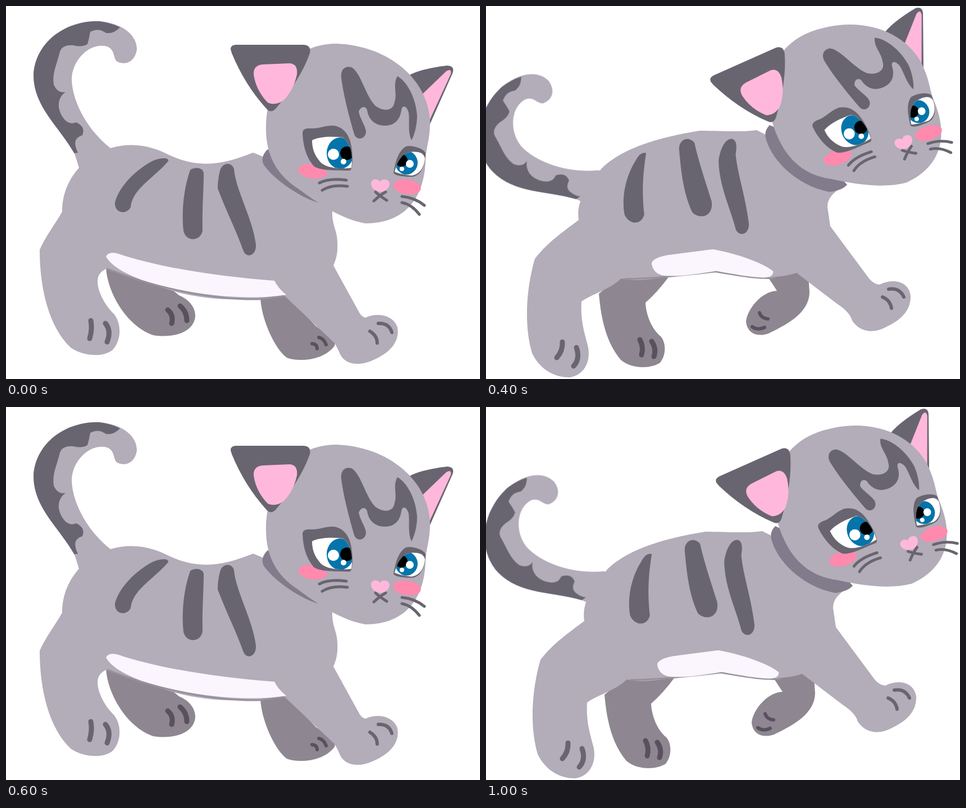
Recreate the animation shown at these times as an HTML page without scripts. Size 844 px wide and 664 px high, loop 1200 ms.

```html
<!DOCTYPE html>
<html lang="en">
<head>
<meta charset="utf-8">
<title>Walking kitten</title>
<style>
  html, body { margin: 0; width: 100%; height: 100%; overflow: hidden; background: #fff; }
  svg { display: block; width: 100%; height: 100%; }
  .fur { fill: #b3acb9; }
  .dark { fill: #696570; }
  .far { fill: #8e8791; }
  .collar { fill: #827b8b; }
  .pink { fill: #ffb8dc; }
  .cheek { fill: #ff8aae; }
  .white { fill: #fff; }
  .belly { fill: #fbf5fd; }
  .iris { fill: #0474aa; }
  .line { fill: none; stroke: #696570; stroke-width: 5; stroke-linecap: round; }
  .toe { stroke-width: 9; }
  .thin { stroke-width: 6; }
  .deep { stroke: #57525d; }
  .shade { fill: none; stroke: #98919d; stroke-width: 3; }

  .pose { opacity: 0; animation: show .6s step-end infinite, step 1.2s step-end infinite; }
  .reach { --dx: 0px; }
  .blink { --dx: 11px; animation-delay: .2s, 0s; }
  .stride { --dx: 10px; animation-delay: .4s, 0s; }
  @keyframes show {
    0% { opacity: 1; }
    33.333%, 100% { opacity: 0; }
  }
  @keyframes step {
    0% { transform: none; }
    50%, 100% { transform: translateX(var(--dx)); }
  }
</style>
</head>
<body>
<svg viewBox="0 0 844 664" preserveAspectRatio="none">
  <defs>
    <g id="tail">
      <path class="fur" d="M130 285L122 262C95 215 50 180 49 125C50 70 100 26 165 27C205 30 233 50 233 77C230 100 212 106 198 99C190 93 195 78 180 72C150 64 118 95 117 130C118 175 150 225 186 253L200 275Z"/>
      <path class="dark" d="M122 263C95 215 50 180 49 125C50 70 100 26 165 27Q188 30 203 38Q192 50 178 48Q165 38 150 46Q148 58 145 68Q135 74 120 70Q98 68 95 85C90 105 82 120 85 140Q92 156 106 153C90 165 90 185 105 203Q115 212 125 207Q142 215 136 230Q120 235 124 250Q126 260 131 264Z"/>
    </g>

    <g id="earL">
      <path class="dark" d="M400 77Q400 69 410 69H530Q544 70 541 84Q525 130 480 183Q471 192 463 182Q425 140 402 84Z"/>
      <path class="pink" d="M441 122Q440 105 458 104L505 102Q520 103 518 122Q512 150 494 168Q480 178 466 172Q445 150 441 122Z"/>
    </g>
    <g id="earR">
      <path class="dark" d="M715 125Q735 112 786 106Q800 107 795 120L755 210L746 230L720 160Z"/>
      <path class="pink" d="M735 163L784 116Q794 110 792 121L753 206L744 226Z"/>
    </g>

    <g id="skull">
      <path class="fur" d="M463 215C465 130 512 67 588 67C680 70 752 130 755 205C755 240 748 250 747 275C745 340 712 387 640 387C600 380 560 355 520 325C480 300 462 262 463 215Z"/>
      <path class="dark" d="M597 128C595 112 605 106 615 109C632 118 640 160 658 178C672 188 690 188 692 170C697 155 688 140 697 125C715 135 730 165 732 195C732 215 726 232 722 239C715 225 719 205 717 190C714 178 706 175 704 185C702 202 692 213 675 213C655 213 645 200 643 185C640 178 632 178 628 188C630 200 641 215 641 224C640 238 624 240 620 228C612 200 601 160 597 128Z"/>
      <ellipse class="cheek" cx="546" cy="294" rx="26" ry="13" transform="rotate(8 546 294)"/>
      <ellipse class="cheek" cx="714" cy="322" rx="25" ry="13" transform="rotate(8 714 322)"/>
      <path class="line" d="M658 331Q664 337 678 346M676 331Q668 335 655 347M558 315Q575 306 606 310M563 328Q580 317 608 321M705 339Q728 341 745 355M705 350Q722 353 736 371"/>
      <path class="pink" d="M650 316C650 307 662 306 666 313C670 306 683 308 683 317C682 327 672 331 667 331C660 330 650 326 650 316Z"/>
    </g>

    <path id="whiteL" d="M545 239C560 232 580 232 600 234C614 245 618 265 615 288C600 290 575 290 562 280C550 268 545 255 545 239Z"/>
    <path id="whiteR" d="M692 295C697 275 706 262 720 260C735 258 745 262 746 272C744 290 735 300 722 302C708 300 698 298 692 295Z"/>
    <clipPath id="clipL"><use href="#whiteL"/></clipPath>
    <clipPath id="clipR"><use href="#whiteR"/></clipPath>
    <g id="eyes">
      <path class="dark" d="M528 226Q528 216 545 218C560 218 568 212 585 213C606 218 616 235 617 270Q617 292 612 293C590 292 560 294 548 285C535 270 529 250 528 226Z"/>
      <path class="dark" d="M690 296C693 280 698 258 712 250C725 247 745 255 747 262C747 290 735 305 720 304C708 304 690 302 690 296Z"/>
      <use href="#whiteL" class="white"/>
      <use href="#whiteR" class="white"/>
      <g clip-path="url(#clipL)">
        <ellipse class="iris" cx="595" cy="262" rx="24" ry="28"/>
        <circle cx="607" cy="262" r="12"/>
        <circle class="white" cx="583" cy="264" r="10"/>
        <circle class="white" cx="601" cy="277" r="5"/>
      </g>
      <g clip-path="url(#clipR)">
        <ellipse class="iris" cx="713" cy="279" rx="20" ry="21"/>
        <circle cx="704" cy="275" r="11"/>
        <circle class="white" cx="719" cy="281" r="7"/>
        <circle class="white" cx="705" cy="290" r="4"/>
      </g>
    </g>

    <g id="coat">
      <path class="dark" d="M274 243Q264 239 254 256C237 280 225 315 229 350C236 369 258 371 264 352C262 310 266 280 274 243Z"/>
      <path class="dark" d="M333 240C333 222 352 216 361 230C366 262 375 295 385 335C388 362 364 368 350 354C336 320 334 280 333 240Z"/>
      <path class="dark" d="M402 264C406 245 415 226 428 227C437 230 436 242 433 255C434 290 446 330 449 380C448 400 430 402 425 388C418 350 400 310 402 264Z"/>
      <path class="shade" d="M222 464C260 467 330 464 384 461C420 469 450 478 490 479"/>
      <path class="belly" d="M272 442C270 432 290 427 310 426L382 421C420 430 470 450 487 467Q487 477 470 477C440 474 420 468 385 460C350 464 320 466 295 463Q275 460 272 442Z"/>
    </g>
  </defs>

  <g class="pose reach">
    <path class="far" d="M178 465C180 510 215 570 262 586C300 592 335 580 337 552C337 535 325 522 308 515L290 500Z"/>
    <path class="far" d="M453 520C455 560 480 612 500 626C520 634 565 632 585 605Q588 595 578 588L552 570L500 515Z"/>
    <path class="line toe deep" d="M288 541Q299 550 295 565M310 534Q322 544 322 560"/>
    <path class="line thin deep" d="M545 601Q554 602 554 610M557 590Q566 592 570 603"/>
    <use href="#tail"/>
    <path class="fur" d="M186 253C230 240 265 252 290 265C340 288 380 285 440 261L462 270L581 365C580 390 590 400 590 420C591 440 588 450 583 462L627 542Q632 553 640 555C660 545 690 550 697 572C702 600 680 620 650 632C630 640 605 640 595 620Q590 608 585 600L495 515C440 527 350 525 290 505L178 468Q163 475 163 490C163 510 178 535 192 548C206 565 206 595 190 612C175 625 140 625 115 608C75 570 60 500 60 434C70 410 90 385 100 366C100 330 115 305 130 288L122 262Z"/>
    <path class="shade" d="M180 468C240 491 340 523 450 522L495 516"/>
    <path class="belly" d="M178 446Q183 436 200 441C270 465 380 482 478 489Q484 502 499 514C430 525 330 516 240 487Q190 468 178 446Z"/>
    <path class="dark" d="M289 276C290 268 270 270 255 279C225 297 200 325 194 350C193 370 215 372 222 358C225 325 265 305 289 276Z"/>
    <path class="dark" d="M328 292C336 286 350 287 352 297C352 330 349 360 350 400C346 420 320 420 316 400C312 360 318 320 328 292Z"/>
    <path class="dark" d="M382 290C388 278 402 278 406 290C408 325 440 380 445 425C446 446 427 450 422 434C410 400 390 360 377 325C377 312 379 300 382 290Z"/>
    <path class="line toe" d="M151 560Q154 575 149 592M177 565Q188 578 180 598"/>
    <path class="line thin" d="M648 579Q661 587 661 600M663 565Q682 564 687 581"/>
    <path class="collar" d="M466 255Q452 268 459 283C480 312 530 345 563 352L540 300Z"/>
    <use href="#earR"/>
    <use href="#skull"/>
    <use href="#eyes"/>
    <use href="#earL"/>
  </g>

  <g class="pose blink">
    <path class="far" d="M227 462V517C245 550 290 595 318 612C345 620 385 617 394 585C396 565 380 552 368 548C345 535 325 522 320 510Q328 490 331 462Z"/>
    <path class="far" d="M473 480V495Q460 484 440 487C415 490 392 500 391 522C395 545 410 544 425 545H480C510 545 535 515 541 473Z"/>
    <path class="line toe deep" d="M344 572Q354 580 353 594M365 563Q377 571 379 586"/>
    <path class="line thin deep" d="M403 517Q404 530 417 532M425 509Q422 519 429 526"/>
    <use href="#tail" transform="translate(142 70) rotate(-22) translate(-208 -75)"/>
    <path class="fur" d="M213 247C270 230 315 213 370 212C410 215 440 216 477 218L500 228L628 327Q590 340 590 362L593 395C625 425 645 455 642 490C635 530 605 570 583 597C565 610 535 605 530 585C525 560 535 515 552 502Q560 496 575 495L541 473C520 480 500 483 470 481C440 476 400 467 382 464C330 466 260 470 220 464Q200 480 194 495C200 525 225 550 238 570C250 600 245 620 220 632C195 638 165 633 140 612C110 575 92 510 87 460C100 420 115 380 148 346Q150 320 158 310L137 275Z"/>
    <use href="#coat"/>
    <path class="line toe" d="M189 574Q197 590 193 606M217 574Q230 588 226 606"/>
    <path class="line thin" d="M553 556Q563 564 578 562M545 584Q560 593 575 584"/>
    <path class="collar" d="M503 211Q487 220 489 235C500 280 550 325 600 337Q620 335 628 327L560 250Z"/>
    <use href="#earR" transform="translate(796 29) rotate(-25) translate(-796 -108)"/>
    <use href="#skull" transform="translate(635 79) rotate(-9.5) translate(-613 -108)"/>
    <path class="dark" d="M572 203C574 196 590 200 600 194C620 184 650 184 660 200C668 220 672 245 668 262C650 266 610 268 590 255C578 240 571 222 572 203Z"/>
    <path class="dark" d="M734 253C734 230 742 206 756 204C770 198 790 196 793 208C796 235 790 248 780 253C770 260 745 254 734 253Z"/>
    <use href="#earL" transform="translate(454 33) rotate(13.5) translate(-400 -72)"/>
  </g>

  <g class="pose stride">
    <path class="far" d="M201 512C205 560 215 600 240 630C262 648 295 645 310 635C322 620 320 598 311 588C295 575 285 550 284 528Q305 510 327 480H241Z"/>
    <path class="far" d="M503 484L518 507C490 508 465 540 463 562C466 588 490 588 503 583C540 565 575 545 576 510L574 480L553 472Z"/>
    <path class="line toe deep" d="M274 594Q281 607 277 621M295 597Q304 610 299 624"/>
    <path class="line thin deep" d="M487 546Q490 556 502 557M474 571Q484 578 496 572"/>
    <use href="#tail" transform="translate(92 149) rotate(-44) translate(-208 -75)"/>
    <path class="fur" d="M205 290C240 255 300 235 380 222C420 222 450 225 482 221L500 230L643 318Q607 335 608 358L613 392L682 485Q690 495 701 496C725 484 752 490 756 515C757 545 735 560 715 570C690 585 665 580 652 560Q648 545 625 530L553 475C520 487 460 485 405 473C370 480 330 478 315 483C290 488 260 490 241 485C220 505 190 512 170 526C168 560 175 580 180 600C188 625 180 655 150 661C120 662 95 645 82 618C65 560 75 490 87 450C110 420 140 400 165 381Q162 360 170 343Z"/>
    <use href="#coat" transform="translate(283 260) rotate(-3.5) translate(-272 -241)"/>
    <path class="line toe" d="M136 598Q137 614 126 626M161 608Q168 628 156 641"/>
    <path class="line thin" d="M706 518Q720 524 722 538M717 504Q736 501 744 518"/>
    <path class="collar" d="M505 212Q495 222 498 235C510 280 560 322 612 331Q635 328 643 318L570 240Z"/>
    <use href="#earR" transform="translate(774 2) rotate(-24.5) translate(-796 -108)"/>
    <g transform="translate(610 75.5) rotate(-24.5) scale(.985) translate(-613 -108)">
      <use href="#skull"/>
      <use href="#eyes"/>
    </g>
    <use href="#earL" transform="translate(398 130) rotate(-24) translate(-400 -72)"/>
  </g>
</svg>
</body>
</html>
```
